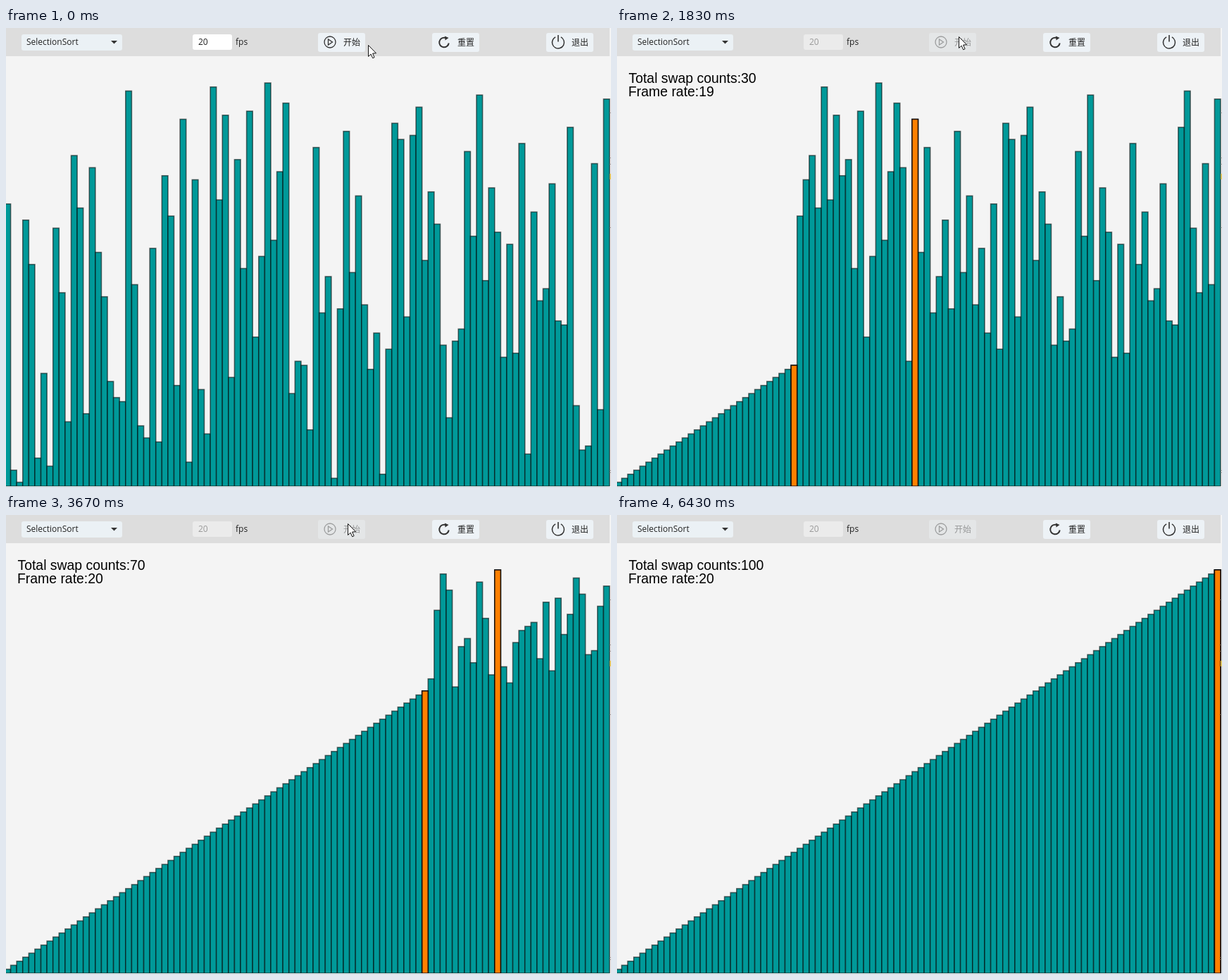
Animation, 859 px wide and 652 px high, one loop 6530 ms. Source, as an HTML page with a canvas:

```html
<!DOCTYPE html>
<html lang="zh">
<head>
<meta charset="utf-8">
<title>SelectionSort</title>
<style>
html, body { margin: 0; width: 100%; height: 100%; overflow: hidden; background: #f4f4f4; }
canvas { display: block; }
</style>
</head>
<body>
<canvas id="stage" width="859" height="652"></canvas>
<script>
const ctx = document.getElementById('stage').getContext('2d');
const LOOP = 6530, PITCH = 8.59, UNIT = 5.73, LEFT = -2, BASE = 651;
const UI = '12px "Open Sans", "Noto Sans", sans-serif';
const CJK = '12px "Noto Sans CJK SC", "Noto Sans CJK", sans-serif';

const values = [
  70, 4, 1, 66, 55, 7, 28, 5, 64, 48, 16, 82, 69, 18, 79, 58, 47, 26, 22, 21,
  98, 50, 15, 12, 59, 11, 77, 67, 25, 91, 6, 76, 24, 13, 99, 71, 92, 27, 81, 54,
  93, 37, 57, 100, 61, 78, 95, 23, 31, 30, 14, 84, 43, 52, 2, 44, 88, 53, 72, 45,
  29, 38, 3, 34, 90, 86, 42, 87, 94, 56, 73, 65, 35, 17, 36, 39, 83, 62, 97, 51,
  74, 63, 32, 60, 33, 85, 8, 68, 46, 49, 75, 41, 40, 89, 20, 9, 10, 80, 19, 96];

// Screen refreshes: first time, last time, number of steps
const bursts = [[240, 880, 12], [940, 1550, 12], [1610, 2230, 12], [2300, 2930, 12],
  [2980, 3610, 12], [3670, 4310, 12], [4360, 4960, 11], [5020, 5640, 12], [5700, 5760, 2]];
const ticks = [0];
for (const [a, b, n] of bursts)
  for (let k = 0; k < n; k++)
    ticks.push(Math.floor((a + k * (b - a) / (n - 1) + 0.001) / 10) * 10);

const clamp = (v, lo, hi) => Math.max(lo, Math.min(hi, v));

function sortAfter(swaps) {
  const list = values.slice();
  let active = [];
  for (let i = 0; i < swaps; i++) {
    const j = list.indexOf(i + 1);
    [list[i], list[j]] = [list[j], list[i]];
    active = [i, j];
  }
  return { list, active };
}

function text(str, x, y, font, color = '#222') {
  ctx.font = font;
  ctx.fillStyle = color;
  ctx.fillText(str, x, y);
}

function box(x, y, w, h, color) {
  ctx.fillStyle = color;
  ctx.beginPath();
  ctx.roundRect(x, y, w, h, 3);
  ctx.fill();
}

function shape(points, fill, stroke) {
  ctx.beginPath();
  points.forEach(([x, y]) => ctx.lineTo(x, y));
  ctx.closePath();
  if (fill) { ctx.fillStyle = fill; ctx.fill(); }
  if (stroke) { ctx.strokeStyle = stroke; ctx.stroke(); }
}

function arc(x, y, r, from, to, width) {
  ctx.beginPath();
  ctx.arc(x, y, r, from, to);
  ctx.strokeStyle = '#333';
  ctx.lineWidth = width;
  ctx.stroke();
}

function button(x, label) {
  box(x, 7, 67, 27, '#edf2f6');
  text(label, x + 36, 24.5, CJK);
}

function toolbar(disabled) {
  ctx.fillStyle = '#ddd';
  ctx.fillRect(0, 0, 857, 40);
  box(22, 9, 143, 23, '#ebf1f5');
  text('SelectionSort', 29, 24, UI);
  shape([[149, 18], [158, 18], [153.5, 22.5]], '#333');
  text('fps', 326, 24, UI);

  ctx.globalAlpha = disabled ? 0.4 : 1;
  box(265, 9, 56, 22, '#fff');
  text('20', 273, 24, UI);
  button(443, '开始');
  arc(460, 20, 8, 0, 7, 1.3);
  ctx.lineWidth = 1.3;
  shape([[457.5, 16], [457.5, 24], [463.5, 20]], null, '#333');
  ctx.globalAlpha = 1;

  button(605, '重置');
  arc(622, 20.5, 6.8, 0.15, 5.2, 2);
  shape([[623, 11.5], [628.5, 14], [623.5, 17.5]], '#333');

  button(767, '退出');
  arc(784, 20.5, 8.5, -1.1, Math.PI + 1.1, 1.5);
  ctx.fillStyle = '#333';
  ctx.fillRect(783.2, 10, 1.6, 9.5);
}

function bar(i, value, fill, stroke) {
  const args = [LEFT + i * PITCH, BASE - value * UNIT, PITCH, value * UNIT];
  ctx.fillStyle = fill;
  ctx.fillRect(...args);
  ctx.strokeStyle = stroke;
  ctx.strokeRect(...args);
}

function bars(list, active) {
  ctx.save();
  ctx.beginPath();
  ctx.rect(0, 40, 858, BASE - 40);
  ctx.clip();
  ctx.lineWidth = 1.6;
  list.forEach((v, i) => bar(i, v, '#099', 'rgba(0,0,0,.55)'));
  active.forEach(i => bar(i, list[i], '#ff8000', 'rgba(0,0,0,.85)'));
  ctx.restore();
}

function edgeMarks() {
  ctx.fillStyle = '#999';
  for (const y of [120, 184, 193, 283, 628, 631]) ctx.fillRect(857, y, 2, 1);
  ctx.fillStyle = '#d8c060';
  ctx.fillRect(857, 207, 2, 8);
}

function pointer(t) {
  if (t >= 5760) return;
  let x, y;
  if (t >= 5700) [x, y] = [809, 158];
  else {
    const go = clamp((t - 180) / 180, 0, 1);
    const leave = clamp((t - 5270) / 370, 0, 1) ** 2;
    x = 514 - 29 * go + 269 * leave;
    y = 24 - 12 * go - 4 * leave;
  }
  ctx.lineWidth = 1;
  const outline = [[0, 0], [0, 16], [3.6, 12.6], [6.2, 18.3], [8.6, 17.2], [6.1, 11.6], [11, 11.3]];
  shape(outline.map(([a, b]) => [x + a + 0.5, y + b + 0.5]), '#fff', '#111');
}

function draw(time) {
  const t = ticks.filter(s => s <= time).pop();
  const swaps = t < 240 ? 0 : clamp(Math.floor(10.4 + (t - 880) / 46.7), 0, 100);
  const { list, active } = sortAfter(swaps);

  ctx.fillStyle = '#f4f4f4';
  ctx.fillRect(0, 0, 859, 652);
  toolbar(t >= 400);
  bars(list, active);
  edgeMarks();
  if (swaps) {
    const font = '19.4px "Liberation Sans", Arial, sans-serif';
    const rate = t < 1300 ? 18 : t < 3350 ? 19 : 20;
    text('Total swap counts:' + swaps, 16.5, 78, font, '#000');
    text('Frame rate:' + rate, 16, 97, font, '#000');
  }
  pointer(t);
}

function loop() {
  draw(performance.now() % LOOP);
  requestAnimationFrame(loop);
}
loop();
</script>
</body>
</html>
```
